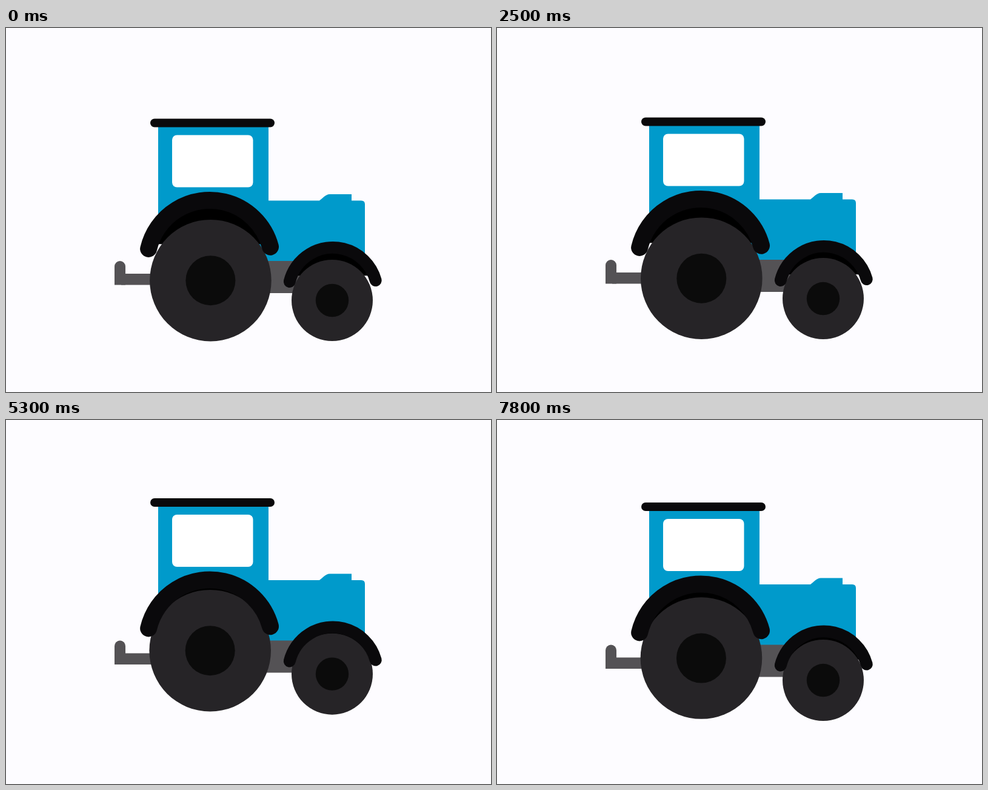
An HTML page with a canvas for the animation above (7.9 s loop, 800 px wide and 600 px high).

```html
<!DOCTYPE html>
<html lang="en">
<head>
<meta charset="utf-8">
<title>Bouncing tractor</title>
<style>
  html, body { margin: 0; width: 100%; height: 100%; overflow: hidden; background: #fdfcff; }
  canvas { display: block; width: 800px; height: 600px; }
</style>
</head>
<body>
<canvas id="stage" width="800" height="600"></canvas>
<script>
const ctx = document.getElementById('stage').getContext('2d');
const LOOP = 7900;
const STEP = 100;
// Body height above its lowest point for each step of one bounce
const LIFT = [0, 2, 17, 29, 27, 20.5, 13.5, 5.5];

const SKY = '#fdfcff';
const BLUE = '#009acb';
const BLACK = '#0a090b';
const SHADE = '#000000';
const GREY = '#545255';
const TYRE = '#262427';
const HUB = '#0b0b0b';

const REAR_ARCH = { x: 336, y: 387.6, r: 103.6, width: 28, left: [235.5, 364], right: [436.5, 360.5], cut: 357 };
const FRONT_ARCH = { x: 539, y: 435.3, r: 73.3, width: 20, left: [468, 418], right: [610, 416], cut: 409 };

function disc(x, y, r, color) {
  ctx.fillStyle = color;
  ctx.beginPath();
  ctx.arc(x, y, r, 0, Math.PI * 2);
  ctx.fill();
}

function box(x, y, w, h, r, color) {
  ctx.fillStyle = color;
  ctx.beginPath();
  ctx.roundRect(x, y, w, h, r);
  ctx.fill();
}

// Draws in coordinates that move up with the body
function raised(lift, draw) {
  ctx.save();
  ctx.translate(0, -lift);
  draw();
  ctx.restore();
}

function drawBody() {
  box(179, 384, 18, 39.5, [9, 9, 0, 0], GREY);
  box(190, 405, 90, 18.5, 0, GREY);
  box(390, 380, 95, 57, 0, GREY);

  ctx.fillStyle = BLUE;
  ctx.beginPath();
  ctx.moveTo(251, 158);
  ctx.lineTo(433, 158);
  ctx.lineTo(433, 284.5);
  ctx.lineTo(517, 284.5);
  ctx.bezierCurveTo(522, 281, 527, 274, 534, 274);
  ctx.lineTo(570, 274);
  ctx.lineTo(570, 284.5);
  ctx.lineTo(586, 284.5);
  ctx.quadraticCurveTo(592, 284.5, 592, 290.5);
  ctx.lineTo(592, 384);
  ctx.lineTo(400, 384);
  ctx.lineTo(400, 330);
  ctx.lineTo(251, 330);
  ctx.closePath();
  ctx.fill();

  box(238, 149.5, 205, 14, 7, BLACK);
  box(274, 176.5, 133.5, 86, 8, '#ffffff');
}

function drawShade(a) {
  const inner = a.r - a.width / 2;
  const dip = Math.asin((a.y - a.cut) / inner);
  ctx.fillStyle = SHADE;
  ctx.beginPath();
  ctx.arc(a.x, a.y, inner + 2, Math.PI + dip, -dip);
  ctx.fill();
}

function drawArch(a) {
  const angle = p => Math.atan2(p[1] - a.y, p[0] - a.x);
  ctx.strokeStyle = BLACK;
  ctx.lineWidth = a.width;
  ctx.lineCap = 'round';
  ctx.beginPath();
  ctx.arc(a.x, a.y, a.r, angle(a.left), angle(a.right));
  ctx.stroke();
}

function drawWheel(x, y, r, hub) {
  disc(x, y, r, TYRE);
  disc(x, y, hub, HUB);
}

function draw(time) {
  const step = Math.floor((time % LOOP) / STEP);
  const lift = LIFT[step % LIFT.length];

  ctx.fillStyle = SKY;
  ctx.fillRect(0, 0, 800, 600);

  raised(lift, () => {
    drawBody();
    drawShade(REAR_ARCH);
    drawShade(FRONT_ARCH);
  });

  drawWheel(337.4 - lift / 29, 416.2 - lift * 1.755, 100.3, 41);
  drawWheel(538, 449 - lift * 1.48, 67, 27.2);

  raised(lift, () => {
    drawArch(REAR_ARCH);
    drawArch(FRONT_ARCH);
  });
}

const start = performance.now();

function tick() {
  draw(performance.now() - start);
  requestAnimationFrame(tick);
}

tick();
</script>
</body>
</html>
```
